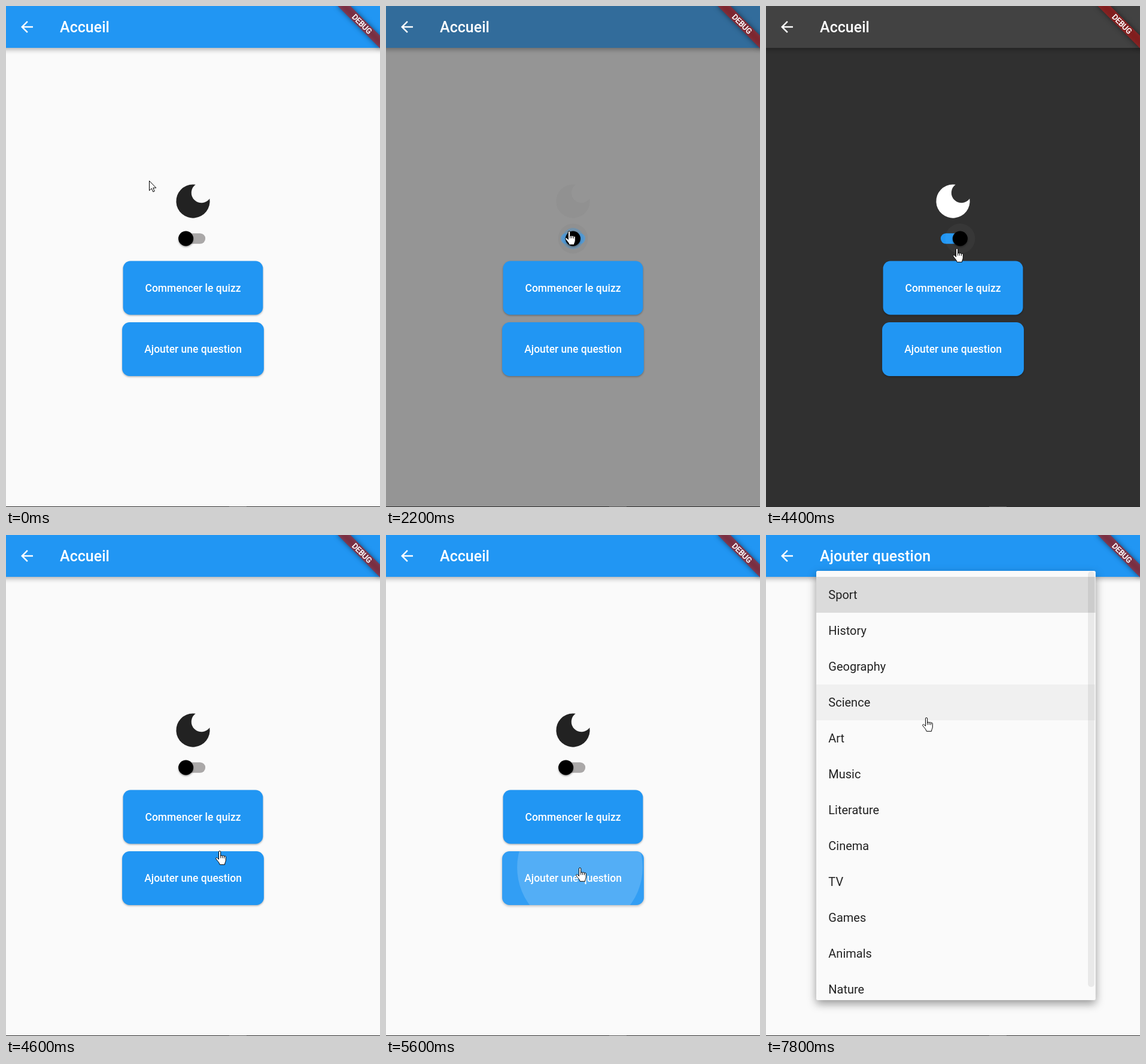
These frames come from a looping animation (625 by 838 pixels, 8000 ms). An HTML page with a canvas:

```html
<!DOCTYPE html>
<html lang="fr">
<head>
<meta charset="utf-8">
<title>Quizz</title>
<style>
  html, body { margin: 0; width: 100%; height: 100%; overflow: hidden; }
  canvas { display: block; }
</style>
</head>
<body>
<canvas id="stage" width="625" height="838"></canvas>
<script>
const ctx = document.getElementById('stage').getContext('2d');
const LOOP = 8000, MID = 312.5, BLUE = '#2196f3', INK = '#222', HINT = '#747474';
const ITEMS = ['Sport', 'History', 'Geography', 'Science', 'Art', 'Music',
  'Literature', 'Cinema', 'TV', 'Games', 'Animals', 'Nature'];

const BACK = new Path2D('M20 11H7.83l5.59-5.59L12 4l-8 8 8 8 1.41-1.41L7.83 13H20z');
const DROP = new Path2D('M7 10l5 5 5-5z');
const MOON = new Path2D('M12 3a9 9 0 1 0 8.9 7.64A5.4 5.4 0 1 1 13.36 3.1Q12.7 3 12 3z');
const ARROW = new Path2D('M.5.5V16.8l3.7-3.6 2.6 5.6 2.4-1-2.4-5.6h5z');
const HAND = new Path2D('M5.5 14.5V2.2a1.6 1.6 0 0 1 3.2 0V9a1.5 1.5 0 0 1 2.9.3 1.5 1.5 0 0 1 2.9.8 1.4 1.4 0 0 1 2.8.9V16c0 2.8-1.6 3.8-1.8 7.3H7.2C6.6 20 3.2 17 1 14c-1-1.7 1-3.2 2.5-1.5z');
const FINGERS = new Path2D('M8.7 8.5V12.5M11.6 9.3V12.5M14.5 10.1V12.8');

// where the pointer rests, when it gets there and how long it travels
const START = { x: 239, y: 292 };
const CLICK = { x: 324, y: 556 };
const MOVES = [
  { end: 1000, time: 600, x: 306, y: 376 },
  { end: 3067, time: 330, x: 270, y: 449 },
  { end: 3467, time: 400, x: 298, y: 392 },
  { end: 4133, time: 330, x: 316, y: 395 },
  { end: 4800, time: 460, x: 384, y: 617 },
  { end: 5200, time: 400, ...CLICK },
  { end: 7067, time: 600, x: 340, y: 305 },
  { end: 7800, time: 133, x: 268, y: 305 },
];

const ramp = (t, start, time) => Math.min(1, Math.max(0, (t - start) / time));
const pulse = (t, on, off, fade = 200) => ramp(t, on, fade) - ramp(t, off, fade);
const smooth = p => p * p * (3 - 2 * p);
const lerp = (a, b, p) => a + (b - a) * p;
const mix = (a, b, p) => `rgb(${a.map((v, i) => Math.round(lerp(v, b[i], p)))})`;

function box(x, y, w, h, r, fill) {
  ctx.beginPath();
  ctx.roundRect(x, y, w, h, r);
  ctx.fillStyle = fill;
  ctx.fill();
}

function disc(x, y, r, fill) {
  ctx.beginPath();
  ctx.arc(x, y, r, 0, 7);
  ctx.fillStyle = fill;
  ctx.fill();
}

function shaded(dy, blur, alpha, draw, dx = 0) {
  ctx.save();
  ctx.shadowOffsetX = dx;
  ctx.shadowOffsetY = dy;
  ctx.shadowBlur = blur;
  ctx.shadowColor = `rgba(0,0,0,${alpha})`;
  draw();
  ctx.restore();
}

function text(s, x, y, size, fill, { align = 'left', weight = 400, outline = 0 } = {}) {
  ctx.font = `${weight} ${size}px Roboto, sans-serif`;
  ctx.textAlign = align;
  ctx.fillStyle = ctx.strokeStyle = fill;
  ctx.fillText(s, x, y);
  if (outline) {
    ctx.lineWidth = outline;
    ctx.lineJoin = 'round';
    ctx.strokeText(s, x, y);
  }
}

function icon(path, x, y, scale, fill) {
  ctx.save();
  ctx.translate(x, y);
  ctx.scale(scale, scale);
  ctx.fillStyle = fill;
  ctx.fill(path);
  ctx.restore();
}

function ripple(x, y, r, fill, bounds) {
  ctx.save();
  ctx.beginPath();
  ctx.roundRect(...bounds);
  ctx.clip();
  disc(x, y, r, fill);
  ctx.restore();
}

function button(label, y, w, hover = 0, press = 0) {
  const bounds = [MID - w / 2, y, w, 90, 12.5];
  shaded(1.5, 3 + press * 2, .28, () => box(...bounds, BLUE));
  if (hover) box(...bounds, `rgba(255,255,255,${.08 * hover})`);
  if (press) ripple(CLICK.x, CLICK.y, 140 * press, 'rgba(255,255,255,.16)', bounds);
  text(label, MID, Math.round(y + 51.2), 17.5, '#fff', { align: 'center', weight: 500 });
}

function home(t, dark) {
  icon(MOON, 275, 289, 3.125, mix([34, 34, 34], [255, 255, 255], dark));
  box(291.9, 380.25, 41.25, 17.5, 8.75, mix([170, 168, 168], [33, 150, 243], dark));
  const thumb = lerp(300.6, 324.4, dark), tone = dark > .5 ? 255 : 0;
  const hover = pulse(t, 800, 2750) + pulse(t, 3800, 4400);
  const press = pulse(t, 1550, 2100);
  disc(thumb, 389, 25, `rgba(${tone},${tone},${tone},${.035 * hover})`);
  disc(thumb, 389, 25 * Math.sqrt(press), `rgba(33,150,243,${.53 * press})`);
  shaded(1.5, 3, .4, () => disc(thumb, 389, 12.5, '#000'));
  button('Commencer le quizz', 426.5, 233.8, pulse(t, 2930, 3200, 130));
  button('Ajouter une question', 529, 236.8, ramp(t, 4800, 200), ramp(t, 5400, 267));
}

function field(label, y, h, fill, select) {
  ctx.beginPath();
  ctx.roundRect(104.7, y, 415.6, h, 5);
  ctx.lineWidth = 1.25;
  ctx.strokeStyle = '#9b9b9b';
  ctx.stroke();
  text(label, 119.5, Math.floor(y + h / 2 + 6), 20, fill);
  if (select) icon(DROP, 475.7, y + h / 2 - 16.5, 1.25, '#666');
}

function form(t) {
  text('Ajouter une question', MID, 206, 35, INK, { align: 'center', outline: 1.1 });
  const press = ramp(t, 7200, 267), hover = pulse(t, 5930, 6540);
  ripple(340, 310, 194 * press, 'rgba(200,200,200,.4)', [104, 277, 417, 70, 5]);
  box(104.5, 550, 416, 69, 5, `rgba(0,0,0,${.045 * hover})`);
  field('Sport', 277.7, 69, INK, true);
  field('Saisir la question', 372.7, 62.6, HINT);
  field("Saisir le lien d'image", 461.3, 62.6, HINT);
  field('Vrai', 550, 69, INK, true);
  button('Soumettre', 644.8, 156.4);
}

function menu(open) {
  const w = 466.8, h = lerp(80, 718, open);
  shaded(6, 15, .4, () => box(84, 60, w, h, 2.5, '#fafafa'));
  ctx.save();
  ctx.beginPath();
  ctx.rect(84, 60, w, h);
  ctx.clip();
  box(84, 70, w, 60, 0, '#dbdbdb');
  box(84, 250, w, 60, 0, '#f0f0f0');
  ITEMS.forEach((s, i) => text(s, 104.3, 107 + 60 * i, 20, INK));
  box(538, 61, 10.8, 695, 5, 'rgba(0,0,0,.065)');
  ctx.restore();
}

function banner() {
  const ribbon = (x, fill) => {
    ctx.translate(x, 0);
    ctx.rotate(Math.PI / 4);
    ctx.fillStyle = fill;
    ctx.fillRect(-50, 35, 100, 15);
  };
  // the opaque ribbon stays off stage and casts only its shadow
  shaded(0, 8, .5, () => ribbon(625 - LOOP, '#000'), LOOP);
  ctx.save();
  ribbon(625, 'rgba(183,28,28,.627)');
  text('DEBUG', 0, 47, 12.75, '#fff', { align: 'center', outline: .6 });
  ctx.restore();
}

function pointer(t, adding) {
  let { x, y } = START;
  for (const m of MOVES) {
    const p = smooth(ramp(t, m.end - m.time, m.time));
    x = lerp(x, m.x, p);
    y = lerp(y, m.y, p);
  }
  const arrow = !adding && y < 360, shape = arrow ? ARROW : HAND;
  ctx.save();
  ctx.translate(Math.round(arrow ? x : x - 7), Math.round(y));
  ctx.fillStyle = '#fff';
  ctx.strokeStyle = '#000';
  ctx.lineWidth = 1;
  ctx.fill(shape);
  ctx.stroke(shape);
  if (!arrow) ctx.stroke(FINGERS);
  ctx.restore();
}

function draw(now) {
  // 15 pictures per second, fewer while the dark theme loads
  const time = now % LOOP;
  const step = time >= 2000 && time < 2400 ? 200 : 1000 / 15;
  const t = Math.floor(time / step + .1) * step;
  const dark = pulse(t, 2100, 4400), adding = t > 5990, open = ramp(t, 7667, 133);

  ctx.fillStyle = mix([250, 250, 250], [48, 48, 48], dark);
  ctx.fillRect(0, 0, 625, 838);
  if (adding) form(t); else home(t, dark);
  shaded(3, 8, .3, () => box(-20, -20, 665, 90, 0, mix([33, 150, 243], [66, 66, 66], dark)));
  icon(BACK, 20, 20, 1.25, '#fff');
  text(adding ? 'Ajouter question' : 'Accueil', 90, 44, 25, '#fff', { weight: 500 });
  if (open) menu(open);
  banner();
  ctx.fillStyle = '#2b2b2b';
  ctx.fillRect(0, 837, 625, 1);
  ctx.fillStyle = '#555';
  ctx.fillRect(373, 837, 29, 1);
  pointer(t, adding);
  requestAnimationFrame(() => draw(performance.now() - start));
}

const start = performance.now();
draw(0);
</script>
</body>
</html>
```
